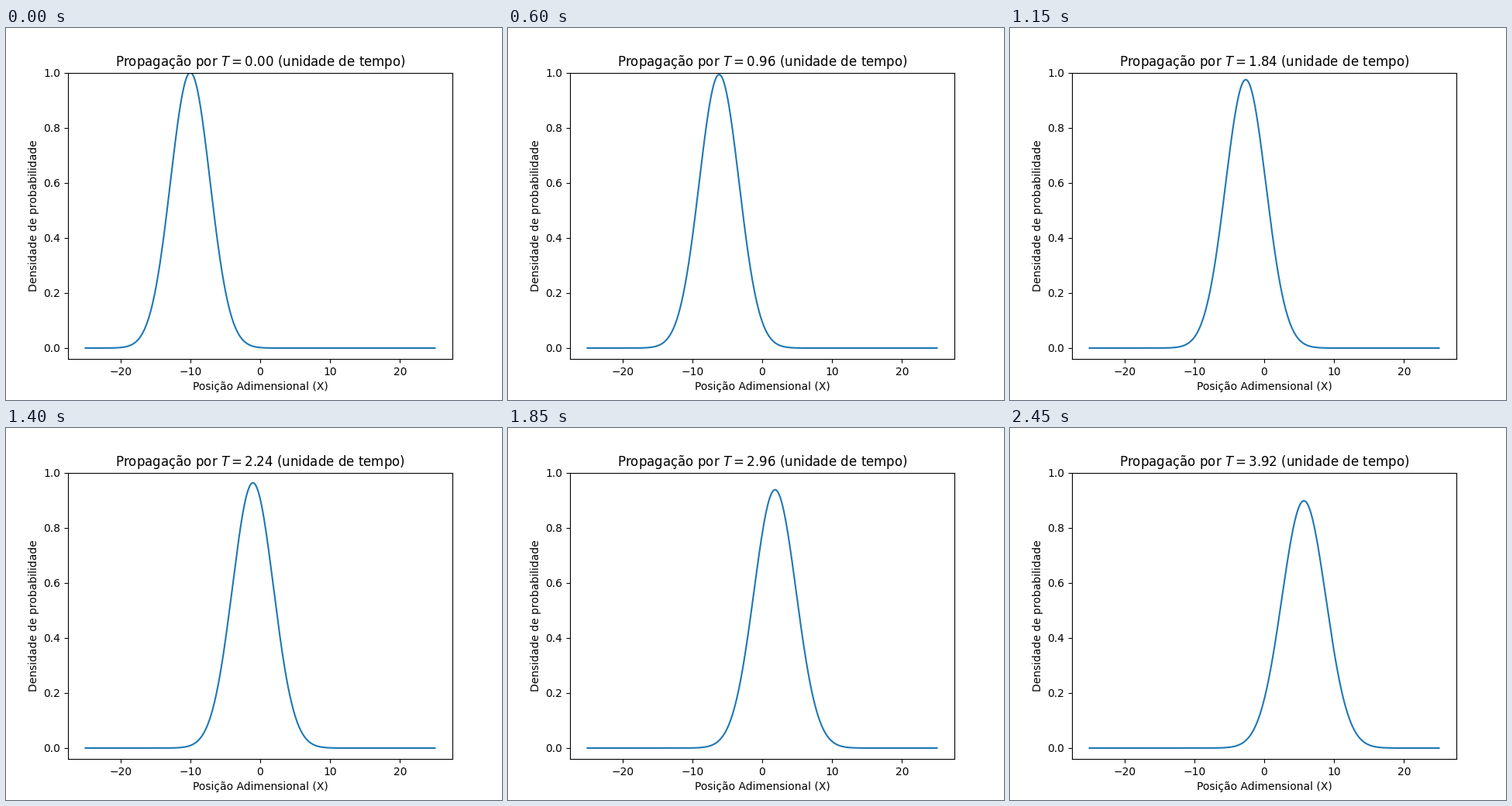
Write a matplotlib script that moves like this. It is 640 px wide and 480 px high and loops after 2.5 s.

```python
import numpy as np
import matplotlib.pyplot as plt
from matplotlib.animation import FuncAnimation

FRAMES = 50
INTERVAL = 50       # ms
DT = 0.08           # time units per frame
X0 = -10.0          # initial centre of the packet
SPEED = 4.0
VARIANCE = 8.0      # initial variance, also the spreading time

plt.rcParams["font.family"] = "DejaVu Sans"

x = np.linspace(-25, 25, 1000)


def density(t):
    """Probability density of a free Gaussian packet, with unit peak at t = 0."""
    spread = 1 + (t / VARIANCE) ** 2
    shift = x - X0 - SPEED * t
    return np.exp(-shift**2 / (2 * VARIANCE * spread)) / np.sqrt(spread)


def title_text(t):
    return rf"Propagação por $T = {t:.2f}$ (unidade de tempo)"


fig, ax = plt.subplots(figsize=(6.4, 4.8), dpi=100)
(line,) = ax.plot(x, density(0))
ax.set_xlim(-27.5, 27.5)
ax.set_ylim(-0.04, 1)
ax.set_xlabel("Posição Adimensional (X)")
ax.set_ylabel("Densidade de probabilidade")
title = ax.set_title(title_text(0))


def update(frame):
    t = frame * DT
    line.set_ydata(density(t))
    title.set_text(title_text(t))
    return line, title


anim = FuncAnimation(fig, update, frames=FRAMES, interval=INTERVAL,
                     repeat=True, repeat_delay=0, blit=False)
plt.show()
```
